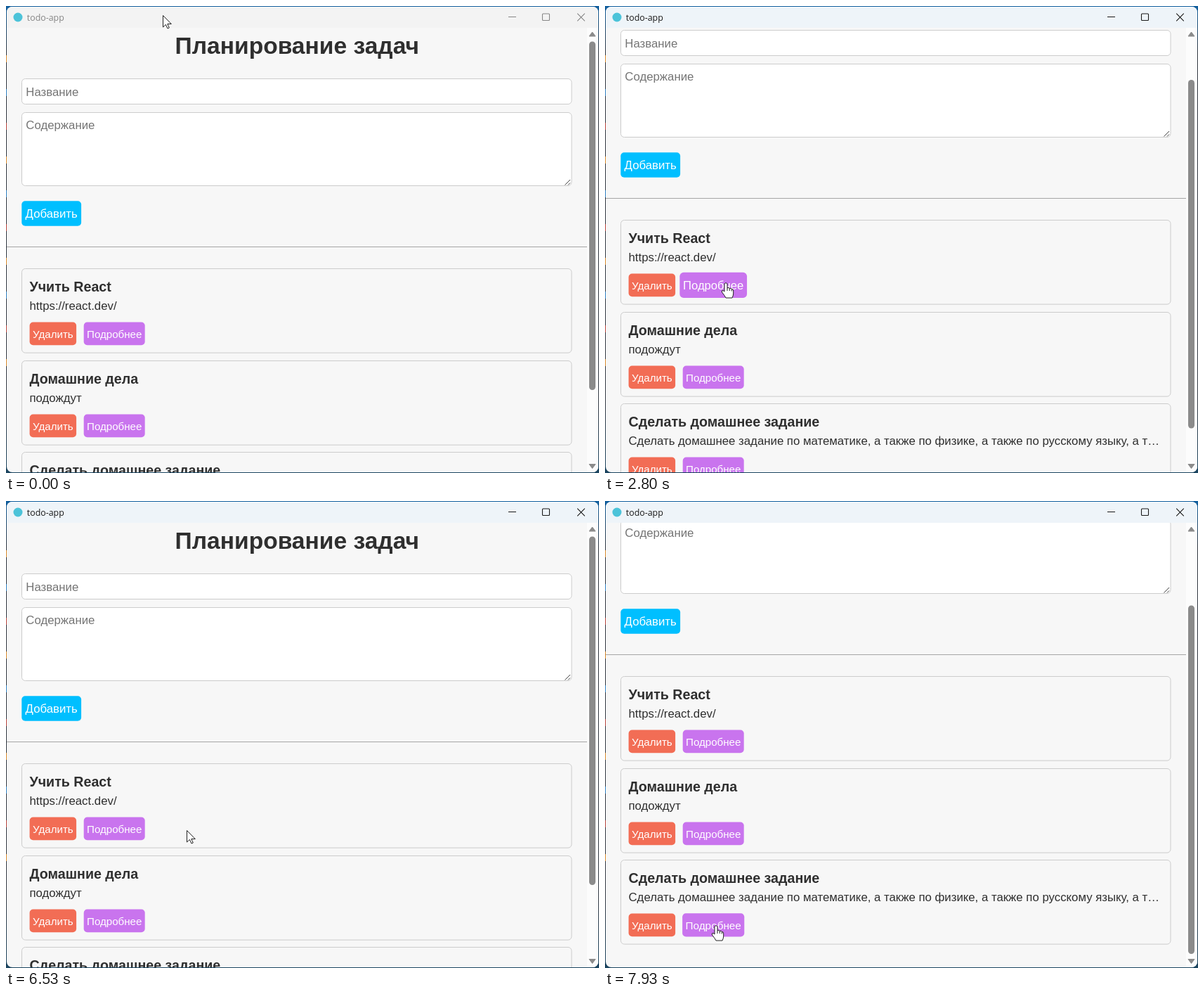
Animation of 844x664 px, one loop 8000 ms. Source, as an HTML page:

```html
<!DOCTYPE html>
<html lang="ru">
<head>
<meta charset="utf-8">
<title>todo-app</title>
<style>
  html, body { margin: 0; width: 844px; height: 664px; overflow: hidden; }
  svg { display: block; font: 16.8px "Liberation Sans", Arial, sans-serif; fill: #2f2f2f; }
  .h1 { font-size: 2em; font-weight: bold; text-anchor: middle; }
  .h3 { font-size: 1.17em; font-weight: bold; }
  .hint { fill: #757575; }
  .btn { fill: #fff; text-anchor: middle; }
  .small { font-size: 0.9em; }
  .bar { font: 12.4px "Open Sans", "Noto Sans", sans-serif; }
  .box { fill: none; stroke: #ccc; }
  .field { fill: #fff; stroke: #ccc; }
  .scroll { fill: #8b8b8b; stroke: #8b8b8b; stroke-linejoin: round; }
  .pointer path { fill: #fff; stroke: #222; stroke-linejoin: round; }
</style>
</head>
<body>
<svg id="stage" width="844" height="664" viewBox="0 0 844 664"></svg>
<script>
const LOOP = 8000, FPS = 15, MAX_SCROLL = 124;
const stage = document.getElementById('stage');

function add(parent, tag, attrs = {}, text) {
  const el = document.createElementNS('http://www.w3.org/2000/svg', tag);
  for (const key in attrs) el.setAttribute(key, attrs[key]);
  if (text) el.textContent = text;
  parent.append(el);
  return el;
}
const rect = (p, x, y, width, height, rx, attrs) =>
  add(p, 'rect', { x, y, width, height, rx, ...attrs });
const label = (p, x, y, text, cls = '') => add(p, 'text', { x, y, class: cls }, text);
const path = (p, d, attrs) => add(p, 'path', { d, ...attrs });

// Desktop behind the window
const defs = add(stage, 'defs');
const sky = add(defs, 'linearGradient', { id: 'sky', x2: 0, y2: 1 });
['#12609f', '#30363f', '#343a44', '#1b4560'].forEach((color, i) =>
  add(sky, 'stop', { offset: [0, 0.1, 0.85, 1][i], 'stop-color': color }));
rect(stage, 0, 0, 844, 664, 0, { fill: 'url(#sky)' });
const tints = ['#d98a2b', '#2f7fc4', '#b8423c'];
for (let i = 0; i < 10; i++) {
  rect(stage, 0, 70 + i * 48, 1, 10, 0, { fill: tints[i % tints.length] });
}

// Window
const clip = add(defs, 'clipPath', { id: 'win' });
rect(clip, 1, 1, 842, 662, 8);
const win = add(stage, 'g', { 'clip-path': 'url(#win)' });
rect(win, 1, 1, 842, 662, 0, { fill: '#f7f7f7' });

// Task list
const listView = add(win, 'g');
const list = add(listView, 'g');

function button(parent, x, y, width, height, color, text, base, cls = '') {
  const g = add(parent, 'g');
  rect(g, x, y, width, height, 5, { fill: color });
  label(g, x + width / 2, base, text, 'btn ' + cls);
  return { g, cx: x + width / 2, cy: y + height / 2 };
}

label(list, 414.3, 68, 'Планирование задач', 'h1');
rect(list, 22.5, 103.5, 782.5, 36, 5, { class: 'field' });
label(list, 28.3, 127.6, 'Название', 'hint');
rect(list, 22.5, 151.5, 782.5, 104, 5, { class: 'field' });
label(list, 28.3, 175.4, 'Содержание', 'hint');
path(list, 'M795.5 254.5l7.5-7.5M800 254.5l3-3', { stroke: '#444', fill: 'none' });
button(list, 22.3, 277.2, 84.8, 35.6, '#00bfff', 'Добавить', 301);
rect(list, 1, 342, 826, 1, 0, { fill: '#a6a6a6' });

const tasks = [
  ['Учить React', 'https://react.dev/'],
  ['Домашние дела', 'подождут'],
  ['Сделать домашнее задание', 'Сделать домашнее задание по математике, а также по физике, ' +
    'а также по русскому языку, а т…']
];
const more = tasks.map(([title, note], i) => {
  const y = Math.floor(373.6 + i * 130.6) + 0.5;
  rect(list, 22.5, y, 782.5, 119.6, 5, { class: 'box' });
  label(list, 33.5, y + 32, title, 'h3');
  label(list, 33.5, y + 58.5, note);
  button(list, 33.6, y + 76, 66.5, 32.8, '#f26d55', 'Удалить', y + 98, 'small');
  return button(list, 110.7, y + 76, 87, 32.8, '#c974ee', 'Подробнее', y + 98, 'small');
});

// Scrollbar
rect(listView, 827, 31, 16, 632, 0, { fill: '#fcfcfc' });
path(listView, 'M830 43L834.5 37L839 43Z', { class: 'scroll' });
path(listView, 'M830 651.5L834.5 657.5L839 651.5Z', { class: 'scroll' });
const thumb = rect(listView, 830, 50.5, 9, 495.5, 4.5, { fill: '#8b8b8b' });

// Details page
const details = add(win, 'g');
const back = { g: add(details, 'g'), cx: 83.5, cy: 81 };
path(back.g, 'M30 77.8L36.5 72.3V75.6H48V80H36.5V83.3Z', { fill: '#5b4f98' });
add(back.g, 'text', { x: 39, y: 90, fill: '#5b4f98', 'text-anchor': 'middle',
  'font-size': 6.4, 'font-weight': 'bold' }, 'BACK');
label(back.g, 55, 87, 'Вернуться');
label(details, 422, 135.5, 'Учить React', 'h1');
rect(details, 22.5, 149.5, 799, 37, 5, { class: 'box' });
label(details, 28, 174, 'https://react.dev/');

// Title bar
const bar = rect(win, 1, 1, 842, 30, 0);
add(win, 'circle', { cx: 17, cy: 16, r: 6.5, fill: '#4cc3d9' });
const caption = label(win, 29.8, 20.5, 'todo-app', 'bar');
const controls = add(win, 'g', { fill: 'none', 'stroke-width': 1.1 });
path(controls, 'M715 15.5h11M813.2 10.7l10.6 10.6m0-10.6l-10.6 10.6');
rect(controls, 763.5, 11, 10, 9.5, 1);

// Pointers
const pointer = add(stage, 'g', { class: 'pointer' });
const shapes = {
  arrow: path(pointer, 'M.5 .5V17L4.4 13.4L7 19L9.3 18L6.8 12.5H12.3Z'),
  hand: path(pointer, 'M-2 2Q0-1 2 2V8Q4 6.7 5.3 8.5Q7.3 7.6 8.3 9.5Q10.7 9.2 10.7 12V16Q10.5 19 9 22' +
    'H0Q-1.5 19-5.5 14Q-6.5 11-4 11.5L-2 13ZM2 8V12M5.3 8.5V12M8.3 9.5V12.5'),
  beam: path(pointer, 'M-4.5-8.5H4.5M0-8.5V9.5M-4.5 9.5H4.5', { style: 'fill:none;stroke-width:1.6' })
};

// Motion
const progress = (t, from, to) => Math.min(1, Math.max(0, (t - from) / (to - from)));
const easeOut = (p, power) => 1 - (1 - p) ** power;
const smooth = p => p * p * (3 - 2 * p);
const within = (t, from, to) => t >= from && t < to;
const show = (el, on) => el.setAttribute('visibility', on ? 'visible' : 'hidden');

// Each stroke of the mouse is one cubic curve that starts where the last one ended
const start = [223, 13];
const strokes = [
  { from: 267, to: 733, a: [200, 100], b: [200, 330], end: [231, 368] },
  { from: 2200, to: 2600, a: [225, 380], b: [200, 388], end: [172, 393] },
  { from: 3467, to: 3667, a: [190, 385], b: [215, 360], end: [238, 341] },
  { from: 4067, to: 4933, a: [410, 260], b: [-22, 190], end: [142, 162] },
  { from: 4933, to: 5400, a: [140, 145], b: [95, 90], end: [76, 79] },
  { from: 6333, to: 6533, a: [115, 190], b: [215, 420], end: [257, 468] },
  { from: 7575, to: 7933, a: [200, 520], b: [170, 595], end: [158, 603] }
];

function mouseAt(t) {
  let pos = start;
  for (const { from, to, a, b, end } of strokes) {
    if (t <= from) break;
    const p = easeOut(progress(t, from, to), 1.5), q = 1 - p;
    pos = pos.map((v, i) => q ** 3 * v + 3 * q * q * p * a[i] + 3 * q * p * p * b[i] + p ** 3 * end[i]);
  }
  return pos.map(Math.round);
}

function scrollAt(t) {
  if (t < 2860) return 69 * easeOut(progress(t, 1333, 2200), 1.85);
  const overshoot = 11;
  return (MAX_SCROLL + overshoot) * smooth(progress(t, 6800, 7267)) -
    overshoot * easeOut(progress(t, 7340, 7667), 2);
}

function grow(item, t, from, to, amount) {
  const s = 1 + (t < to ? amount * smooth(progress(t, from, from + 300)) : 0);
  item.g.setAttribute('transform',
    `translate(${item.cx} ${item.cy}) scale(${s}) translate(${-item.cx} ${-item.cy})`);
}

function pointerKind(t, y) {
  if (within(t, 2460, 2930) || within(t, 5260, 6195) || t > 7860) return 'hand';
  return within(t, 4600, 5060) && y > 157 && y < 179 ? 'beam' : 'arrow';
}

function draw(t) {
  const scroll = scrollAt(t), [x, y] = mouseAt(t);
  const onDetails = within(t, 2860, 6130), active = t > 2725;
  show(listView, !onDetails);
  show(details, onDetails);
  list.setAttribute('transform', `translate(0 ${-Math.round(scroll)})`);
  thumb.setAttribute('y', 50.5 + 0.79 * Math.min(scroll, MAX_SCROLL));
  grow(more[0], t, 2460, 2930, 0.1);
  grow(more[2], t, 7865, LOOP, 0.1);
  grow(back, t, 5195, 6130, 0.09);

  const ink = active ? '#1a1a1a' : '#868686';
  bar.setAttribute('fill', active ? '#eef4f9' : '#f3f3f3');
  caption.setAttribute('fill', ink);
  controls.setAttribute('stroke', ink);

  const kind = pointerKind(t, y);
  for (const name in shapes) show(shapes[name], name === kind);
  pointer.setAttribute('transform', `translate(${x} ${y})`);
}

function tick(now) {
  const frame = Math.floor(((now % LOOP) + 4) * FPS / 1000);
  draw(frame * 1000 / FPS % LOOP);
  requestAnimationFrame(tick);
}
draw(0);
requestAnimationFrame(tick);
</script>
</body>
</html>
```
